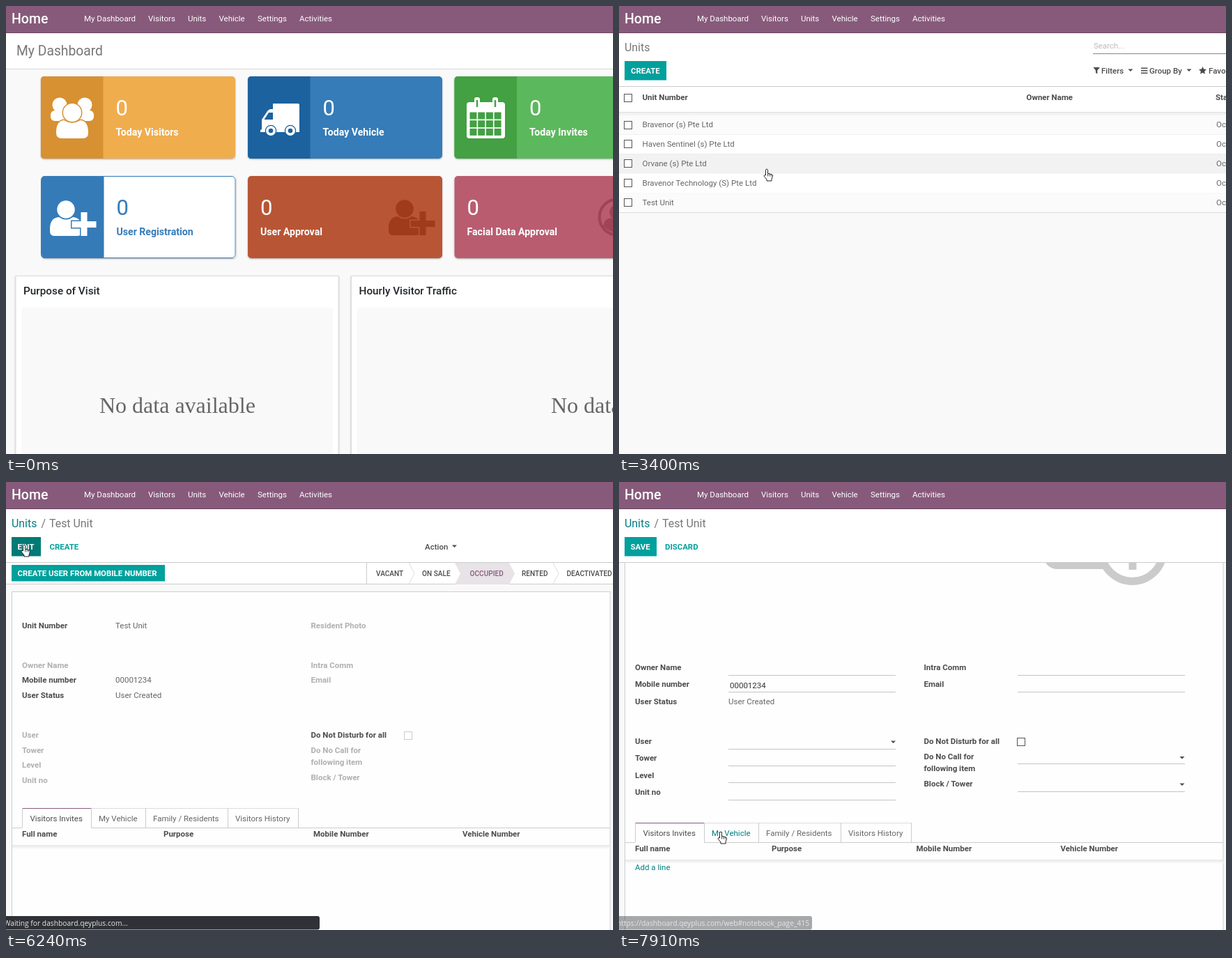
Write an HTML page that moves like this. It is 871 px wide and 643 px high and loops after 7.99 s.

```html
<!DOCTYPE html>
<html lang="en">
<head>
<meta charset="utf-8">
<title>Unit dashboard</title>
<style>
  html, body { margin: 0; width: 100%; height: 100%; overflow: hidden; background: #f9f9f9; }
  svg { display: block; width: 871px; height: 643px; font-family: Roboto, sans-serif; }
  text { white-space: pre; }
</style>
</head>
<body>
<svg id="stage" viewBox="0 0 871 643"></svg>
<script>
const LOOP = 7990;
const TEAL = '#00a09d', TEAL_DARK = '#007a77', LINK = '#017e84', PLUM = '#875a7b';
const INK = '#4c4c4c', GREY = '#666', DIM = '#b0b0b0';
const PHONE = '00001234';
const COMPANIES = ['Bravenor (s) Pte Ltd', 'Haven Sentinel (s) Pte Ltd', 'Orvane (s) Pte Ltd',
  'Bravenor Technology (S) Pte Ltd', 'Test Unit'];
const HOST = 'dashboard.qeyplus.com';

// Pointer moves: start, end, steps, x, y
const MOVES = [
  [210, 670, 7, 222, 13], [820, 1050, 4, 270, 12], [1780, 2170, 6, 270, 47],
  [3100, 3400, 5, 212, 234], [3480, 3870, 6, 212, 270], [3950, 4030, 2, 212, 272],
  [4410, 4410, 1, 213, 276], [4860, 5630, 11, 41, 101], [5710, 5870, 3, 26, 90],
  [6560, 6870, 5, 134, 514], [7590, 7910, 5, 146, 502]
];
// Status bubble: start, end, width, text, opacity
const BUBBLES = [
  [820, 2010, 181, `https://${HOST}/web#`, 1],
  [2010, 3180, 309, `https://${HOST}/web#menu_id=116&amp;action=140`, 1],
  [4630, 5170, 450, `Waiting for ${HOST}...`, 1],
  [6180, 6720, 450, `Waiting for ${HOST}...`, 1],
  [7830, 7910, 277, `https://${HOST}/web#notebook_page_415`, .2],
  [7910, LOOP, 277, `https://${HOST}/web#notebook_page_415`, .42]
];
const SCROLL = [[7190, 100], [7270, 165], [7350, 220], [7430, 247]];

const text = (x, y, s, size = 11.5, fill = GREY, weight = 400, extra = '') =>
  `<text x="${x}" y="${y}" font-size="${size}" fill="${fill}" font-weight="${weight}" ${extra}>${s}</text>`;
const rect = (x, y, w, h, fill, extra = '') =>
  `<rect x="${x}" y="${y}" width="${w}" height="${h}" fill="${fill}" ${extra}/>`;
const path = (d, fill, extra = '') => `<path d="${d}" fill="${fill}" ${extra}/>`;
const disc = (x, y, r, fill, extra = '') => `<circle cx="${x}" cy="${y}" r="${r}" fill="${fill}" ${extra}/>`;
const hline = (x, y, w, fill = '#ccc') => rect(x, y, w, 1, fill);
const group = (s, extra = '') => `<g ${extra}>${s}</g>`;
const caret = (x, y) => path(`M${x - 3.5} ${y - 1.5}h7l-3.5 3.5z`, INK);
const box = (x, y, stroke = '#555') => rect(x + .5, y + .5, 11, 11, '#fff', `stroke="${stroke}"`);
const inside = (p, x, y, w, h) => p.x >= x && p.x < x + w && p.y >= y && p.y < y + h;

function pointerAt(t) {
  let x = 480, y = 340;
  for (const [start, end, steps, tx, ty] of MOVES) {
    if (t < start) break;
    const gap = (end - start) / Math.max(1, steps - 1);
    const k = gap ? Math.min(1, (Math.floor((t - start) / gap + 1e-6) + 1) / steps) : 1;
    x += (tx - x) * k;
    y += (ty - y) * k;
  }
  return { x, y };
}

function pointer(p, hand) {
  const shape = hand
    ? 'M-1.5 9V1.5Q-1.5 .2 0 .2T1.5 1.5V6.5L4 6.8 8 8.2Q8.6 8.5 8.5 10L7 14.5V17H0V15L-3.8 10.3Q-4.2 9 -2.8 8.5Z'
    : 'M0 0V12.5L3 9.8 5 14 7 13 5.2 9H9Z';
  const lines = hand ? 'M1.5 6.5v4M4 7v3.5M6.3 7.6v3' : '';
  return group(path(shape, '#fff', 'stroke="#222" stroke-linejoin="round"') +
    path(lines, 'none', 'stroke="#222" stroke-width=".8"'), `transform="translate(${p.x} ${p.y})"`);
}

function navbar(p, open) {
  const hot = (x, w, on) => on ? rect(x, 0, w, 38, '#6f4a65') : '';
  const items = [[112, 'My Dashboard'], [204, 'Visitors'], [261, 'Units'], [305.5, 'Vehicle'],
    [361, 'Settings'], [421, 'Activities']];
  return rect(0, 0, 871, 38, PLUM) + hline(0, 38, 871, '#68465f') +
    hot(195, 57, inside(p, 195, 0, 57, 39)) +
    hot(252, 44, open || inside(p, 252, 0, 44, 39)) +
    text(8, 25, 'Home', 19.5, '#fff', 500) +
    items.map(([x, s]) => text(x, 22, s, 11.5, '#fff')).join('');
}

function dropdown(p) {
  const hot = inside(p, 251, 44, 90, 27);
  return rect(251.5, 39.5, 89, 63, '#fff', 'stroke="#ccc"') +
    (hot ? rect(252, 45, 88, 26, '#eee') : '') +
    text(269, 62, 'Units', 11.5, INK) + text(269, 88, 'Towers', 11.5, INK);
}

const userPlus = (fill, back) =>
  path('M63 320Q63 304 76 303Q86 310 96 303Q109 304 109 320V325Q108 330 102 330H69Q63 330 63 323Z', fill) +
  disc(86, 292, 13.5, fill, `stroke="${back}" stroke-width="1.5"`) +
  path('M107.5 296h9v13h13v9h-13v12h-9v-12h-13v-9h13z', fill,
    `stroke="${back}" stroke-width="3" paint-order="stroke"`);

const people = back => {
  const side = x => disc(x, 142, 10.5, '#fff') +
    rect(x - 13, 150, 26, 15, '#fff', 'rx="6"');
  const cut = `stroke="${back}" stroke-width="3" paint-order="stroke"`;
  return side(77) + side(113) +
    path('M72 182Q72 165 83 164Q95 171 107 164Q118 165 118 182Q118 190 110 190H80Q72 190 72 182Z', '#fff', cut) +
    disc(95, 153, 13, '#fff', cut);
};

const truck = back =>
  path('M383 140H419Q421 140 421 142V181H365V178L367 177V163L375 151Q377 148 380 148H383Z', '#fff') +
  path('M370.5 163L377 153H383V163Z', back) +
  [380, 408].map(x => disc(x, 179, 7, '#fff', `stroke="${back}" stroke-width="2.5" paint-order="stroke"`) +
    disc(x, 179, 3.3, back)).join('');

const calendar = back => {
  let s = rect(661, 138, 55, 52, '#fff', 'rx="4"');
  for (let i = 0; i < 12; i++) s += rect(665.5 + i % 4 * 11.7, 152.5 + (i / 4 | 0) * 11.7, 10, 10, back);
  return s + [676, 702].map(x => rect(x - 4, 131, 8, 16, '#fff', 'rx="3"') + rect(x - 1.2, 135, 2.4, 10, back)).join('');
};

const faceCircle = fill => disc(877, 303, 25.5, 'none', `stroke="${fill}" stroke-width="4"`) +
  disc(877, 296, 11, fill) + path('M857 316Q859 305 868 304Q877 311 886 304Q895 305 897 316Q877 334 857 316Z', fill);

function card(x, y, label, fill, side, icon, ink = '#fff', hover = false) {
  const shadow = `rx="5" filter="url(#${hover ? 'lift' : 'soft'})"`;
  const dx = side ? 107.5 : 18;
  return rect(x, y, 279, 118, fill, shadow) +
    (side ? path(`M${x + 89.5} ${y}v118h-84.5q-5 0 -5 -5v-108q0 -5 5 -5z`, side) : '') + icon +
    text(x + dx, y + 56, '0', 31, ink) + text(x + dx, y + 84.5, label, 14.1, ink, 700);
}

function panel(x, title, tx) {
  return rect(x, 387.5, 463, 270, '#fff', 'stroke="#ddd" filter="url(#soft)"') +
    text(x + 11, 413.5, title, 15.3, '#212529', 500) + rect(x + 8, 433, 447, 220, '#f9f9f9') +
    text(tx, 584, 'No data available', 32, GREY, 400, 'font-family="Liberation Serif, serif"');
}

function dashboard(p, shown) {
  const blue = '#357bb8';
  return rect(0, 39, 871, 51, '#fff') + hline(0, 90, 871, '#d9d9d9') +
    text(15, 71, 'My Dashboard', 19.3, '#777') +
    card(50, 101, 'Today Visitors', '#f0ad4e', '#d79132', people('#d79132')) +
    card(347, 101, 'Today Vehicle', blue, '#1b629f', truck('#1b629f')) +
    card(643.5, 101, 'Today Invites', '#5cb85c', '#43a043', calendar('#43a043')) +
    card(51, 244, 'User Registration', '#fff', blue, userPlus('#fff', blue), blue) +
    rect(50.5, 244.5, 278.5, 117, 'none', `rx="5" stroke="${blue}"`) +
    card(347, 244, 'User Approval', '#b85434', '', group(userPlus('#9f3a1b', '#b85434'), 'transform="translate(486 -1)"'),
      '#fff', shown && inside(p, 347, 244, 279, 118)) +
    card(643.5, 244, 'Facial Data Approval', '#b95c70', '', faceCircle('#9f4358')) +
    panel(14, 'Purpose of Visit', 134) + panel(495.5, 'Hourly Visitor Traffic', 782);
}

function list(p, t) {
  let s = rect(0, 39, 871, 118, '#fff') + text(8, 65, 'Units', 15.9, '#777') +
    rect(8, 79, 60, 27.5, TEAL) + text(17, 96.5, 'CREATE', 11.4, '#fff', 700) +
    text(681, 61, 'Search...', 11.5, '#bbb') + hline(680, 68, 191, '#888') +
    (t >= 4260 ? rect(682, 51, 1, 14, '#333') : '') +
    path('M680.5 88h9.5l-3.6 4.5v5l-2.3 -1.8v-3.2z', INK) + text(692, 96.5, 'Filters', 11.5, INK, 500) + caret(734, 92) +
    [88.5, 92, 95.5].map(y => rect(749, y, 9.5, 1.5, INK)).join('') +
    text(761, 96.5, 'Group By', 11.5, INK, 500) + caret(818, 92) +
    path('M837.5 87l1.7 3.5 3.8 .5-2.8 2.7 .7 3.8-3.4-1.8-3.4 1.8 .7-3.8-2.8-2.7 3.8-.5z', INK) +
    text(846, 96.5, 'Favorites', 11.5, INK, 500) + hline(0, 115, 871) +
    box(7, 126) + text(33.5, 135, 'Unit Number', 11.5, INK, 700) +
    text(584.5, 135, 'Owner Name', 11.5, INK, 700) + text(856, 135, 'Status', 11.5, INK, 700) +
    hline(0, 152, 871, '#ddd') + rect(0, 153, 871, 4, '#f2f2f2');
  COMPANIES.forEach((name, i) => {
    const y = 156.5 + i * 27.9;
    const hot = inside(p, 0, y, 871, 27.9);
    s += rect(0, y, 871, 28, hot ? '#f2f2f2' : i % 2 ? '#fff' : '#fbfbfb') +
      hline(0, Math.round(y + 27.4), 871, '#dcdcdc') +
      box(7, Math.round(y + 8)) + text(33.5, y + 17.5, name) + text(857, y + 17.5, 'Occupied');
  });
  return s;
}

function stages() {
  const names = [[531, 'VACANT'], [597, 'ON SALE'], [665.5, 'OCCUPIED'], [740, 'RENTED'], [804.5, 'DEACTIVATED']];
  const arrow = x => path(`M${x} 116l8 15.5l-8 15`, 'none', 'stroke="#ddd"');
  return rect(517, 116, 1, 31, '#ccc') + arrow(578) + arrow(785) +
    path('M644 116H722L730 131.5 722 147H644L652 131.5Z', '#e7e3e7') +
    names.map(([x, s], i) => text(x, 134.7, s, 10.1, i === 2 ? PLUM : INK, 500)).join('');
}

function tabs(y, p, dy, columns) {
  const edges = [23, 122, 200, 318, 419];
  const names = [[34.5, 'Visitors Invites'], [133, 'My Vehicle'], [211, 'Family / Residents'], [329, 'Visitors History']];
  let s = hline(9, y + 28, 14) + hline(122, y + 28, 745) + hline(23, y, 396, '#ddd') + hline(23, y, 99, PLUM);
  edges.forEach(x => s += rect(x, y, 1, 28, '#ccc'));
  names.forEach(([x, name], i) => {
    const hot = i === 1 && inside({ x: p.x, y: p.y + dy }, edges[i], y, 78, 29);
    s += text(x, y + 18.5, name, 11.5, i === 0 ? INK : hot ? LINK : GREY);
  });
  ['Full name', 'Purpose', 'Mobile Number', 'Vehicle Number'].forEach((name, i) =>
    s += text(columns[i], y + 40.5, name, 11.5, INK, 700));
  return s + rect(9, y + 53, 858, 6, 'url(#fade)');
}

const labels = rows => rows.map(([x, y, s, dim]) => text(x, y, s, 11.5, dim ? DIM : INK, 700)).join('');

function readForm(p) {
  return labels([[23, 209.5, 'Unit Number'], [437.5, 209.5, 'Resident Photo', 1],
    [23, 267, 'Owner Name', 1], [437.5, 267, 'Intra Comm', 1], [23, 288.3, 'Mobile number'], [437.5, 288.3, 'Email', 1],
    [23, 310, 'User Status'], [23, 367, 'User', 1], [23, 388.5, 'Tower', 1], [23, 410, 'Level', 1], [23, 431.5, 'Unit no', 1],
    [437.5, 367, 'Do Not Disturb for all'], [437.5, 389, 'Do No Call for', 1], [437.5, 406.3, 'following item', 1],
    [437.5, 428, 'Block / Tower', 1]]) +
    text(157, 209.5, 'Test Unit') + text(157, 288.3, PHONE) + text(157, 310, 'User Created') +
    box(571, 358, '#ccc') + tabs(468, p, 0, [23, 226, 441, 655]);
}

function camera() {
  const grey = '#cbcbcb';
  return rect(609, 262, 177, 110, grey, 'rx="20"') + path('M652 263L677 239H716L742 263Z', grey) +
    disc(697, 317, 33, '#fff') + disc(736.5, 345, 50, grey) + disc(736.5, 345, 39, '#fff') +
    rect(709, 339.5, 56, 11, grey) + rect(731.5, 317, 11, 56, grey);
}

function editForm(p, dy) {
  const line = (y, x = 157) => hline(x, y, 240, '#c4c4c4');
  return labels([[23, 209.5, 'Unit Number'], [437.5, 209.5, 'Resident Photo'],
    [23, 517, 'Owner Name'], [437.5, 517, 'Intra Comm'], [23, 541.3, 'Mobile number'], [437.5, 541.3, 'Email'],
    [23, 565.7, 'User Status'], [23, 623, 'User'], [23, 647.3, 'Tower'], [23, 671.7, 'Level'], [23, 696, 'Unit no'],
    [437.5, 623, 'Do Not Disturb for all'], [437.5, 645, 'Do No Call for'], [437.5, 662.3, 'following item'],
    [437.5, 684, 'Block / Tower']]) +
    text(159, 210, 'Test Unit', 11.5, '#333') + hline(157, 216, 240, '#444') + camera() +
    text(159, 542.7, PHONE, 11.5, '#333') + text(157, 565.7, 'User Created') +
    [524, 548, 630, 654, 678, 703].map(y => line(y)).join('') +
    [524, 548, 651, 691].map(y => line(y, 572)).join('') +
    caret(393.5, 620) + caret(808, 642.5) + caret(808, 681) + box(571, 614) +
    tabs(736, p, dy, [23, 219, 426.5, 633.5]) + text(23, 804, 'Add a line', 11.5, LINK);
}

function form(p, t) {
  const editing = t >= 6320;
  const dy = SCROLL.reduce((y, [start, value]) => t >= start ? value : y, 0);
  const width = editing ? 46 : 42;
  const hot = inside(p, 8, 79, width, 27) ? TEAL_DARK : TEAL;
  const userHot = !dy && inside(p, 8, 119, 220, 23) ? TEAL_DARK : TEAL;
  const body = rect(0, 116, 871, 31, '#fff') + hline(0, 146, 871) +
    rect(8, 119, 220, 23.5, userHot) + text(16.5, 134.7, 'CREATE USER FROM MOBILE NUMBER', 11.4, '#fff', 700) +
    stages() + rect(8.5, 157.5, 858.5, 900, '#fefefe', 'stroke="#ccced6"') +
    (editing ? editForm(p, dy) : readForm(p));
  return group(group(body, `transform="translate(0 ${-dy})"`), 'clip-path="url(#below)"') +
    rect(0, 39, 871, 76, '#fff') + hline(0, 115, 871) +
    text(8, 65, 'Units', 15.9, LINK) + text(50.5, 65, '/', 15.9, '#777') + text(62, 65, 'Test Unit', 15.9, '#777') +
    rect(8, 79, width, 27.5, hot) + text(16.5, 96.5, editing ? 'SAVE' : 'EDIT', 11.4, '#fff', 700) +
    (editing ? text(66, 96.5, 'DISCARD', 11.4, TEAL, 700)
      : text(62.5, 96.5, 'CREATE', 11.4, TEAL, 700) + text(601, 96.5, 'Action', 11.5, INK, 500) + caret(643.5, 92));
}

function bubble(t) {
  const hit = BUBBLES.find(([start, end]) => t >= start && t < end);
  if (!hit) return '';
  const [, , width, label, opacity] = hit;
  return rect(-5, 623, width + 5, 19.5, '#2f3136', `rx="3" opacity="${opacity}"`) +
    text(-3, 636.5, label, 10.25, '#e4e6e8', 400, 'font-family="Open Sans, Noto Sans, sans-serif"');
}

const DEFS = `<defs>
  <filter id="soft" x="-10%" y="-10%" width="120%" height="125%"><feDropShadow dx="0" dy="1" stdDeviation="1.2" flood-opacity=".32"/></filter>
  <filter id="lift" x="-10%" y="-10%" width="120%" height="125%"><feDropShadow dx="0" dy="2" stdDeviation="1.6" flood-opacity=".4"/></filter>
  <linearGradient id="fade" x2="0" y2="1"><stop stop-color="#e6e6e6"/><stop offset="1" stop-color="#fefefe"/></linearGradient>
  <clipPath id="below"><rect y="116" width="871" height="527"/></clipPath>
</defs>`;

function render(t) {
  const p = pointerAt(t);
  const shown = t >= 210;
  const open = t >= 1380 && t < 2550;
  const page = t < 2790 ? dashboard(p, shown) : t < 4630 ? list(p, t) : form(p, t);
  const overNav = t >= 670 && t < 2310;
  const overRow = t >= 3250 && t < 4410;
  const overButton = t >= 5560 && t < 6560 && p.y < 107;
  const hand = overNav || overRow || overButton || t >= 7830;
  const nobody = { x: -99, y: -99 };
  return DEFS + rect(0, 0, 871, 643, '#f9f9f9') + page + navbar(shown ? p : nobody, open) +
    (open ? dropdown(p) : '') + bubble(t) + (shown ? pointer(p, hand) : '');
}

const stage = document.getElementById('stage');
const began = performance.now();
let last = '';
function tick() {
  const markup = render((performance.now() - began) % LOOP);
  if (markup !== last) stage.innerHTML = last = markup;
  requestAnimationFrame(tick);
}
tick();
</script>
</body>
</html>
```
